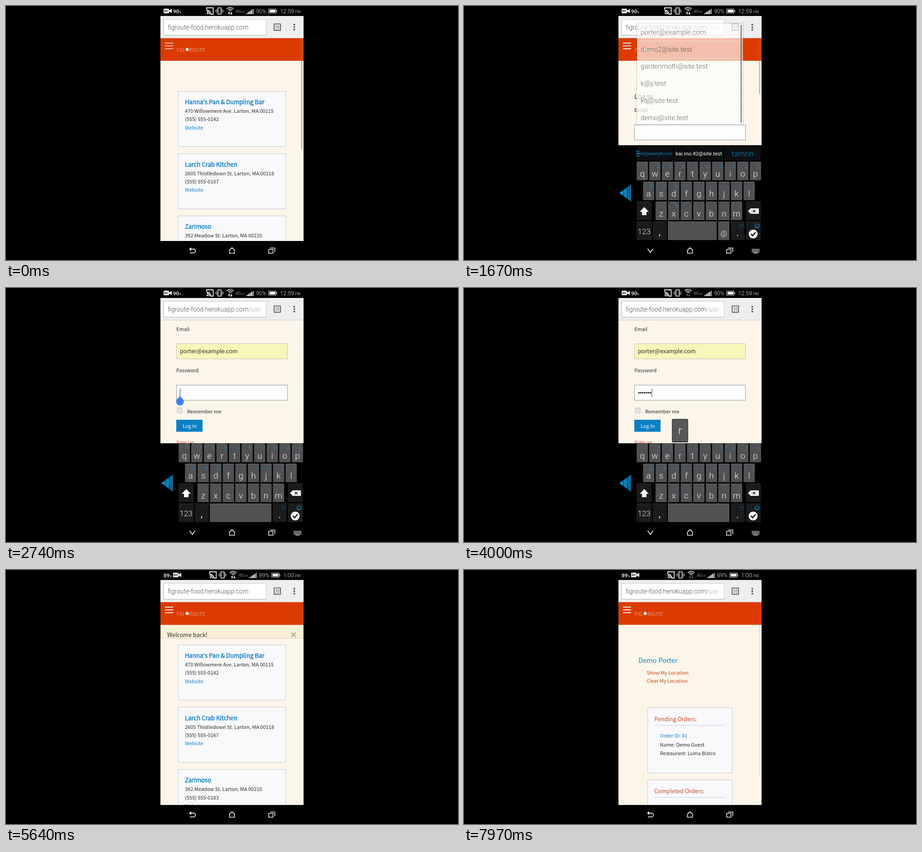
Animation of 998x561 px, one loop 8 s. Source, as an HTML page with a canvas:

```html
<!DOCTYPE html>
<html lang="en">
<head>
<meta charset="utf-8">
<title>Phone login demo</title>
<style>
html, body { margin: 0; width: 100%; height: 100%; overflow: hidden; background: #000; }
canvas { display: block; width: 998px; height: 561px; }
</style>
</head>
<body>
<canvas id="stage"></canvas>
<script>
const W = 998, H = 561, LOOP = 8000;
const canvas = document.getElementById('stage');
const ratio = window.devicePixelRatio || 1;
canvas.width = W * ratio;
canvas.height = H * ratio;
const c = canvas.getContext('2d');

const SANS = '"Noto Sans CJK JP", "Noto Sans CJK SC", "Noto Sans", sans-serif';
const THIN = 'Roboto, "Open Sans", sans-serif';
const BLUE = '#1580c4', RUST = '#c8451c', INK = '#2b2b2b', CREAM = '#fcf6ea';
const KEY_BLUE = '#1686bd';
const LEFT = 341, RIGHT = 657;

// Moments of the story, in ms
const T = {
  login: 1000, keys: 1300, popup: 1590, pick: 2030, password: 2330,
  type: 2960, submit: 4380, home: 4560, profile: 5720, loaded: 6380
};
const PASSWORD = 'password', STROKE = 169;

const clamp = v => Math.max(0, Math.min(1, v));
const progress = (t, from, span) => clamp((t - from) / span);
const ease = p => p * p * (3 - 2 * p);

function rect(x, y, w, h, fill, stroke) {
  if (fill) { c.fillStyle = fill; c.fillRect(x, y, w, h); }
  if (stroke) { c.strokeStyle = stroke; c.lineWidth = 1; c.strokeRect(x + .5, y + .5, w - 1, h - 1); }
}

function round(x, y, w, h, r, fill) {
  c.beginPath();
  c.roundRect(x, y, w, h, r);
  c.fillStyle = fill;
  c.fill();
}

function circle(x, y, r, fill) {
  c.beginPath();
  c.arc(x, y, r, 0, Math.PI * 2);
  c.fillStyle = fill;
  c.fill();
}

function path(points, close) {
  c.beginPath();
  points.forEach(([x, y], i) => i ? c.lineTo(x, y) : c.moveTo(x, y));
  if (close) c.closePath();
}

function line(points, color, width = 1.5, close = false) {
  path(points, close);
  c.strokeStyle = color;
  c.lineWidth = width;
  c.stroke();
}

function poly(points, fill) {
  path(points, true);
  c.fillStyle = fill;
  c.fill();
}

function text(s, x, y, font, color, align = 'left') {
  c.font = font;
  c.fillStyle = color;
  c.textAlign = align;
  c.fillText(s, x, y);
}

const sans = (s, x, y, size, color = INK) => text(s, x, y, `400 ${size}px ${SANS}`, color);
const thin = (s, x, y, size, color, align, weight = 300) =>
  text(s, x, y, `${weight} ${size}px ${THIN}`, color, align);

function heavy(s, x, y, size, color) {
  sans(s, x, y, size, color);
  c.strokeStyle = color;
  c.lineWidth = .5;
  c.strokeText(s, x, y);
}

function clipped(x, y, w, h, draw) {
  c.save();
  c.beginPath();
  c.rect(x, y, w, h);
  c.clip();
  draw();
  c.restore();
}

/* ---------- status bar ---------- */

function camera(x) {
  round(x, 6, 12, 10, 1.5, '#fff');
  poly([[x + 12, 10], [x + 18, 6.5], [x + 18, 15.5], [x + 12, 12]], '#fff');
  thin('REC', x + 6, 13, 5, '#000', 'center', 700);
}

function wifi(x, active) {
  c.strokeStyle = '#eee';
  c.lineWidth = 1.6;
  for (const r of [3, 6.5, 10]) {
    c.beginPath();
    c.arc(x, 13, r, Math.PI * 1.23, Math.PI * 1.77);
    c.stroke();
  }
  const color = active ? '#fff' : '#666';
  poly([[x - 5, 16], [x - 2.5, 12.5], [x, 16]], color);
  rect(x - 3.2, 15, 1.5, 4, color);
  poly([[x, 16], [x + 2.5, 19.5], [x + 5, 16]], color);
  rect(x + 1.8, 13, 1.5, 4, color);
}

function statusBar(t) {
  const late = t >= T.home;
  const charge = late ? '89' : '90';
  const active = !(t > 3800 && t < 4200) && t < 7700;
  const x = late ? 348 : 369;
  thin(charge, x, 16, 11.5, '#fff', 'left', 500);
  thin('%', x + c.measureText(charge).width, 16, 6.5, '#fff', 'left', 500);
  camera(late ? 369 : 348);

  c.save();
  c.translate(late ? 6.7 : 0, 0);
  line([[443, 8], [443, 4], [457.5, 4], [457.5, 18], [452, 18]], '#eee', 1.8);
  c.strokeStyle = '#fff';
  for (const r of [3, 6.5, 9.5]) {
    c.beginPath();
    c.arc(443, 18.5, r, -Math.PI / 2, 0);
    c.stroke();
  }
  line([[468, 4], [475, 4], [475, 18], [468, 18]], '#e8e8e8', 1.6, true);
  for (const s of [-1, 1]) {
    line([[471.5 + s * 6, 7], [471.5 + s * 6, 15]], '#ccc', 1.3);
    line([[471.5 + s * 8.5, 8.5], [471.5 + s * 8.5, 13.5]], '#aaa', 1.2);
  }
  wifi(495, active);
  thin('4G', 507, 15, 9.5, '#888', 'left', 400);
  thin('LTE', 519.5, 14.5, 4.5, '#888', 'left', 500);
  for (let i = 0; i < 5; i++)
    rect(531 + i * 3.4, 15.5 - i * 2.3, 2.5, 2.5 + i * 2.3, i < 4 ? '#eee' : '#999');
  thin(charge + '%', 552, 16, 12.2, '#eee');
  line([[580, 6.5], [596, 6.5], [596, 16], [580, 16]], '#ccc', 1.2, true);
  rect(582, 8.3, 12.5, 6, '#fff');
  rect(597, 9, 1.6, 4.5, '#ccc');
  c.restore();

  thin(late ? '1:00' : '12:59', late ? 612 : 605, 16, 12.8, '#eee');
  thin('PM', 638, 16, 8.4, '#ddd');
}

/* ---------- browser ---------- */

function addressBar(deep) {
  rect(LEFT, 22, RIGHT - LEFT, 49, '#eeeeef');
  rect(348, 29, 227, 36, '#fff', '#c9c9cb');
  rect(349, 64, 225, 1, '#a8a8aa');
  const host = 'figroute-food.herokuapp.com';
  thin(host, 357, 52, 14, '#505052');
  if (deep) {
    const x = 357 + c.measureText(host).width;
    const fade = c.createLinearGradient(x, 0, 568, 0);
    fade.addColorStop(0, '#96969a');
    fade.addColorStop(1, '#d4d4d8');
    clipped(349, 30, 217, 34, () => thin('/use', x, 52, 14, fade));
  }
  line([[592, 39.7], [606, 39.7], [606, 53.5], [592, 53.5]], '#56565a', 1.8, true);
  thin('35', 599, 50, 8.5, '#56565a', 'center', 400);
  for (const y of [41.2, 46.7, 52.2]) circle(636.5, y, 1.9, '#505054');
}

function banner(y, dim) {
  rect(LEFT, y, RIGHT - LEFT, 50, '#dc3b00');
  for (let i = 0; i < 3; i++)
    rect(351, y + 10 + i * 6.2, 18, 1.8, dim ? '#f8cdbd' : '#fff');
  thin('FIG', 377, y + 29.5, 11, '#f4c4b0');
  circle(400, y + 25, 3.6, '#fff');
  thin('ROUTE', 405, y + 29.5, 11, '#f4c4b0');
}

const scrollThumb = (top, bottom, color) => round(651.5, top, 3, bottom - top, 1.5, color);

/* ---------- pages ---------- */

const PLACES = [
  ["Hanna's Pan & Dumpling Bar", '470 Willowmere Ave. Larton, MA 00115', '(555) 555-0142'],
  ['Larch Crab Kitchen', '2605 Thistledown St. Larton, MA 00118', '(555) 555-0167'],
  ['Zarimoso', '392 Meadow St. Larton, MA 00210', '(555) 555-0183']
];

function placeCard([name, street, phone], y) {
  rect(380, y, 238, 123, '#f9f9fc', '#c2c7cf');
  heavy(name, 395, y + 29, 13.2, BLUE);
  sans(street, 395, y + 48, 11);
  sans(phone, 395, y + 66.3, 11);
  sans('Website', 395, y + 84.7, 11, BLUE);
}

function homePage(t) {
  const back = t >= T.home;
  banner(71, !back);
  if (back) {
    rect(LEFT, 121, RIGHT - LEFT, 30, '#faf0d6', '#d9cfb8');
    sans('Welcome back!', 356, 147.5, 12.6);
    line([[630, 138], [640, 148]], '#8b8983', 1.7);
    line([[640, 138], [630, 148]], '#8b8983', 1.7);
  }
  PLACES.forEach((p, i) => placeCard(p, (back ? 165 : 188) + i * 137.6));
  if (!back) scrollThumb(72, 317, 'rgba(125,115,110,.5)');
}

const EMAIL = 'porter@example.com';

function loginPage(t) {
  const scroll = 139.5 * ease(progress(t, T.password, 230));
  const onPassword = t >= T.password;
  const typed = typedCount(t);
  c.save();
  c.translate(0, -scroll);
  banner(71, false);
  sans('Log In', 376, 205, 14.7);
  sans('Email', 376, 234, 11);
  rect(376, 262, 246, 34.5, t >= T.pick ? '#f7f7b9' : '#fdfdfe', onPassword ? '#c3c3b6' : '#8f959c');
  if (t >= T.pick) sans(EMAIL, 384, 283.5, 12.6);
  sans('Password', 376, 325.5, 11);
  rect(376, 353.5, 246, 34.5, '#fdfdfe', onPassword ? '#8f959c' : '#c6c8cc');
  round(377.5, 404, 12, 12, 2, '#b9b9bd');
  round(378.5, 405, 10, 10, 1.5, '#e6e6ea');
  sans('Remember me', 400, 416.5, 11);
  rect(376, 430.5, 58, 26.5, t >= T.submit ? '#07659f' : '#0b7fc4');
  sans('Log In', 390, 448, 11, '#fff');
  sans('Sign up', 376, 485, 11.2, RUST);

  if (onPassword) {
    for (let i = 0; i < typed; i++) circle(386.2 + i * 4.25, 370.7, 1.75, '#222');
    rect(typed ? 385 + typed * 4.2 : 383.8, 361.5, 1, 18, '#333');
  }
  c.restore();
  if (onPassword && !typed && t > T.password + 200) touchHandle(384, 251);
  if (!onPassword) scrollThumb(72, t < T.keys ? 317 : 195, 'rgba(125,115,110,.45)');
}

function touchHandle(x, y) {
  c.fillStyle = '#4080f3';
  c.beginPath();
  c.moveTo(x, y - 12);
  c.lineTo(x + 6.1, y - 5.9);
  c.arc(x, y, 8.6, -Math.PI / 4, Math.PI * 1.25);
  c.closePath();
  c.fill();
}

function orderCard(title, y, h) {
  rect(405, y, 188, h, '#f9f9fc', '#c2c7cf');
  sans(title, 420, y + 30, 12.6, RUST);
  rect(420, y + 39, 158, 1, '#c9cbd5');
}

function profilePage(t) {
  banner(71, false);
  sans('Demo Porter', 385, 204.5, 14.7, BLUE);
  sans('Show My Location', 403, 231, 11, RUST);
  sans('Clear My Location', 403, 249.3, 11, RUST);
  orderCard('Pending Orders:', 303.5, 145);
  sans('Order ID: #1', 432.5, 370, 11, BLUE);
  sans('Name: Demo Guest', 432.5, 389.5, 11);
  sans('Restaurant: Luma Bistro', 432.5, 409, 11);
  orderCard('Completed Orders:', 463, 145);
  scrollThumb(122, 455, 'rgba(125,115,110,.15)');
  if (t < T.loaded)
    rect(LEFT, 69, (RIGHT - LEFT) * (.2 + .8 * ease(progress(t, T.profile, 420))), 2, '#3d82d6');
}

/* ---------- keyboard ---------- */

const ROWS = [
  ['qwertyuiop', '1234567890', 381.2, 344],
  ['asdfghjkl', '@#&*-+=()', 395.2, 388],
  ['zxcvbnm', '_$"\':;/', 422.8, 432]
];
const PITCH = 27.75;

function key(x, y, w, dark) {
  round(x, y, w, 41, 2, dark ? '#1b1b1c' : '#515153');
  rect(x + 1, y, w - 2, 1, dark ? '#38383a' : '#737375');
}

function keyPlace(ch) {
  const row = ROWS.find(r => r[0].includes(ch));
  return [row[2] + row[0].indexOf(ch) * PITCH, row[3]];
}

function sideArrow(y) {
  const edge = x => (x - 343) * .74;
  const part = (a, b, color) =>
    poly([[a, y - edge(a)], [b, y - edge(b)], [b, y + edge(b)], [a, y + edge(a)]], color);
  part(343, 351, '#1193d0');
  part(351.7, 360, '#0d7fb6');
  part(360.7, 369, '#0a6797');
}

function suggestions() {
  rect(381, 310, 81, 31, '#0d0f11');
  rect(464, 310, 109, 31, '#0d0f11');
  rect(575, 310, 80, 31, '#0d0f11');
  for (const y of [320, 325, 330]) rect(379.5, y, 8, 1.5, KEY_BLUE);
  clipped(381, 310, 81, 31, () => thin(EMAIL, 459.5, 328.5, 8.7, KEY_BLUE, 'right', 400));
  thin('kai.mo.42@site.test', 518.5, 329.5, 11.5, '#fff', 'center', 400);
  thin('tamrin', 615, 331.5, 17, KEY_BLUE, 'center');
}

function keyboard(t) {
  const mail = t < T.password;
  const top = mail ? 307.5 : 343;
  rect(LEFT, top, RIGHT - LEFT, 519 - top, '#000');
  if (mail) suggestions();
  sideArrow(mail ? 413 : 431);

  for (const [letters, marks, x0, y] of ROWS)
    [...letters].forEach((ch, i) => {
      const x = x0 + i * PITCH;
      key(x, y, 25, false);
      thin(ch, x + 12.5, y + 32.5, 19, '#f0f0f0', 'center');
      thin(marks[i], x + 23, y + 13.5, 11.5, KEY_BLUE, 'right');
    });

  key(381, 432, 33.5, true);
  poly([[398, 444], [408, 454.5], [403, 454.5], [403, 462], [393, 462], [393, 454.5], [388, 454.5]], '#fff');
  key(622.5, 432, 33, true);
  poly([[627, 453], [633, 447], [651, 447], [651, 459], [633, 459]], '#fff');
  line([[637.5, 450], [643.5, 456]], '#111', 1.6);
  line([[643.5, 450], [637.5, 456]], '#111', 1.6);

  key(381, 476, 33.5, true);
  thin('123', 397.7, 503.5, 17, '#eee', 'center');
  key(417, 476, 30.5, true);
  thin(',', 432, 506, 20, '#fff', 'center', 400);
  key(450, 476, mail ? 108 : 136, false);
  if (mail) {
    key(561, 476, 25, false);
    thin('@', 573.5, 508, 16, '#f0f0f0', 'center');
  }
  key(589, 476, 30.5, true);
  thin('.', 604, 508, 20, '#fff', 'center', 400);
  thin(',!?', 617, 490, 11, KEY_BLUE, 'right');
  key(622.5, 476, 33, true);
  circle(638.5, 503.5, 9.8, '#fff');
  line([[633.5, 503.5], [637.3, 507.5], [644, 499.5]], '#111', 2.6);
  c.strokeStyle = KEY_BLUE;
  c.lineWidth = 1.1;
  c.beginPath();
  c.arc(647, 485.5, 4.8, 0, Math.PI * 2);
  c.stroke();
  c.beginPath();
  c.arc(647, 486, 2.6, .2, Math.PI - .2);
  c.stroke();
  circle(645.2, 484, .7, KEY_BLUE);
  circle(648.8, 484, .7, KEY_BLUE);
}

const typedCount = t =>
  t < T.type ? 0 : Math.min(PASSWORD.length, 1 + Math.floor((t - T.type) / STROKE));

function pressedKey(t) {
  const n = typedCount(t);
  if (!n || t - T.type - (n - 1) * STROKE > 120) return;
  const ch = PASSWORD[n - 1];
  const [x, y] = keyPlace(ch);
  round(x - 5.5, y - 55, 36, 52, 3, '#343436');
  round(x - 4.5, y - 54, 34, 49, 2, '#58585b');
  thin(ch, x + 12.5, y - 21, 24, '#f4f4f4', 'center');
}

/* ---------- email list ---------- */

const EMAILS = [EMAIL, 'demo2@site.test', 'gardenmoth@site.test', 'k@y.test', 'kq@site.test', 'demo@site.test'];

function emailList(t) {
  const alpha = t < T.pick ? progress(t, T.popup, 120) : 1 - progress(t, T.pick, 120);
  if (!alpha) return;
  c.save();
  c.globalAlpha = alpha;
  // Edge lines stand in for a shadow, which would show through the fading panel
  rect(380, 37, 238, 226, null, 'rgba(0,0,0,.07)');
  rect(381, 38, 236, 225, null, 'rgba(0,0,0,.18)');
  rect(382, 39, 234, 223, '#fff');
  EMAILS.forEach((mail, i) => {
    const y = 63 + i * 37.7;
    thin(mail, 390, y, 15.2, '#222');
    if (i < 5) rect(383, y + 14, 228, 1, '#eee');
  });
  rect(610.5, 42, 3, 215, '#555');
  c.restore();
}

/* ---------- navigation bar ---------- */

function navBar(typing) {
  rect(LEFT, 519, RIGHT - LEFT, 42, '#000');
  if (typing) {
    line([[405.5, 536], [411.5, 544.5], [417.5, 536]], '#eee', 1.8);
    for (let r = 0; r < 3; r++)
      for (let i = 0; i < 6; i++) rect(635.5 + i * 2.9, 536.5 + r * 2.8, 2, 1.9, '#ddd');
    rect(639, 544.8, 10, 1.6, '#ddd');
  } else {
    line([[406, 537], [414, 537]], '#eee', 1.8);
    c.beginPath();
    c.arc(414, 541.2, 4.2, -Math.PI / 2, Math.PI / 2);
    c.lineTo(406, 545.4);
    c.stroke();
    poly([[404, 537], [409, 533], [409, 541]], '#eee');
  }
  line([[493.5, 539], [499, 534], [504.5, 539], [504.5, 546], [493.5, 546]], '#eee', 1.7, true);
  line([[580, 537.5], [589.5, 537.5], [589.5, 546], [580, 546]], '#eee', 1.6, true);
  line([[583, 534.5], [593.5, 534.5], [593.5, 543.5]], '#eee', 1.6);
}

/* ---------- frame ---------- */

function draw(t) {
  c.setTransform(ratio, 0, 0, ratio, 0, 0);
  rect(0, 0, W, H, '#000');
  const onLogin = t >= T.login && t < T.home;
  const onProfile = t >= T.profile;
  const typing = t >= T.keys && t < T.home;

  statusBar(t);
  addressBar(onLogin || onProfile);
  rect(LEFT, 71, RIGHT - LEFT, 448, CREAM);
  const top = onProfile ? 69 : 71;
  clipped(LEFT, top, RIGHT - LEFT, 519 - top, () => {
    if (onProfile) profilePage(t);
    else if (onLogin) loginPage(t);
    else homePage(t);
  });
  if (onLogin) rect(LEFT, 70.5, RIGHT - LEFT, 1, 'rgba(120,120,130,.35)');
  if (typing) {
    keyboard(t);
    emailList(t);
    pressedKey(t);
  }
  navBar(typing);
}

function tick(now) {
  draw(now % LOOP);
  requestAnimationFrame(tick);
}
draw(0);
requestAnimationFrame(tick);
</script>
</body>
</html>
```
